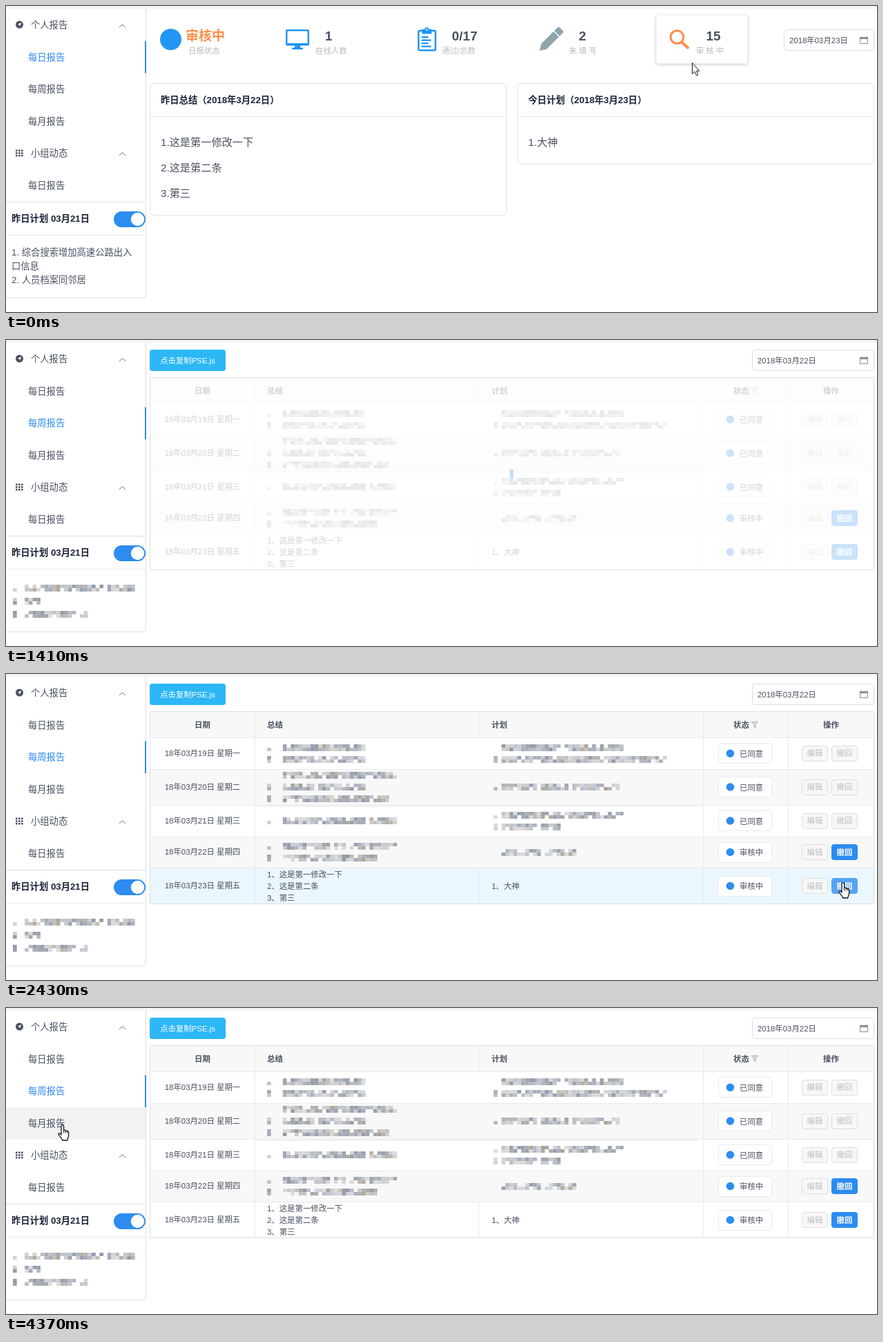
An HTML page with a canvas that plays this animation: 1261 px wide and 444 px high, repeating every 4690 ms.

```html
<!DOCTYPE html>
<html lang="zh-CN">
<head>
<meta charset="utf-8">
<title>日报</title>
<style>
html, body { margin: 0; width: 100%; height: 100%; overflow: hidden; background: #fff; }
canvas { display: block; width: 1261px; height: 444px; }
</style>
</head>
<body>
<canvas id="stage" width="1261" height="444"></canvas>
<script>
const c = document.getElementById('stage').getContext('2d');
const LOOP = 4690, TICK = LOOP / 60;
const FONT = '"Liberation Sans", "Noto Sans CJK SC", "Noto Sans CJK", sans-serif';
const BLUE = '#2d8cf0', INK = '#495060', DARK = '#1c2438', LINE = '#dddee1', SOFT = '#e9eaec', PALE = '#bbbec4';
const ORANGE = '#ff8f4c', STRIPE = '#f8f8f9';
const S = 11.4, M = 13.3, L = 15.2, XL = 19;

// Pointer moves: first tick, last tick, x, y at the end; it rests in between
const MOVES = [
  [0, 0, 993, 82], [0, 7, 98, 146], [7, 8, 102, 152], [9, 12, 102, 127],
  [20, 21, 990, 120], [21, 24, 1135, 257], [24, 27, 1213, 317], [27, 31, 1211, 302],
  [35, 41, 1212, 258], [46, 47, 1196, 262], [47, 53, 90, 196], [53, 56, 81, 169]
];
const PAGE_AT = 1185, HIDE = 16, SHOW = 23;
const ROWS = [92.5, 138, 190, 236, 281, 334];
const MIDS = ROWS.slice(1).map((y, i) => (y + ROWS[i]) / 2);

function pointer(tick) {
  let x = 0, y = 0;
  for (const [a, b, px, py] of MOVES) {
    if (tick < a) break;
    const k = b > a ? Math.min(1, (tick - a) / (b - a)) : 1;
    x += (px - x) * k;
    y += (py - y) * k;
  }
  return { x, y, on: tick < HIDE || tick >= SHOW };
}

const inside = (p, x0, y0, x1, y1) => p.on && p.x >= x0 && p.x < x1 && p.y >= y0 && p.y < y1;
// Hover strength, trailing the pointer by two ticks
const glow = (tick, ...area) => (inside(pointer(Math.max(0, tick - 1)), ...area) + inside(pointer(Math.max(0, tick - 2)), ...area)) / 2;

function rect(x, y, w, h, color) {
  c.fillStyle = color;
  c.fillRect(x, y, w, h);
}

function round(x, y, w, h, r, color) {
  c.beginPath();
  c.roundRect(x, y, w, h, r);
  c.fillStyle = color;
  c.fill();
}

function frame(x0, y0, x1, y1, r, color, fill) {
  c.beginPath();
  c.roundRect(x0 + .5, y0 + .5, x1 - x0 - 1, y1 - y0 - 1, r);
  if (fill) { c.fillStyle = fill; c.fill(); }
  c.strokeStyle = color;
  c.lineWidth = 1;
  c.stroke();
}

function disc(x, y, r, color) {
  c.beginPath();
  c.arc(x, y, r, 0, 7);
  c.fillStyle = color;
  c.fill();
}

function line(color, width, ...pts) {
  c.beginPath();
  for (let i = 0; i < pts.length; i += 2) c.lineTo(pts[i], pts[i + 1]);
  c.strokeStyle = color;
  c.lineWidth = width;
  c.stroke();
}

// y is the middle of the glyphs
function text(s, x, y, size, color = INK, bold = false, align = 'left') {
  c.font = (bold ? 'bold ' : '') + size + 'px ' + FONT;
  c.textAlign = align;
  c.fillStyle = color;
  c.fillText(s, x, y + size * .37);
}

const lineY = (mid, i, n, pitch) => mid + (i - (n - 1) / 2) * pitch;

// Censored lines: a marker block, a gap, then random blocks up to each width
function mosaic(x, mid, pitch, gap, widths, seed) {
  const rnd = () => (seed = (seed * 16807) % 2147483647) / 2147483647;
  const cell = 5.7;
  widths.forEach((w, i) => {
    const y = Math.round(lineY(mid, i, widths.length, pitch)) - 5;
    for (let row = 0; row < 2; row++)
      for (let dx = 0; dx < w - 2; dx += cell) {
        const skip = dx > 1 && dx < gap || rnd() < .14;
        const hue = rnd() < .2 ? 35 : 218, light = 62 + rnd() * 25;
        if (!skip) rect(x + dx, y + row * 5, cell, 5, `hsl(${hue}, 11%, ${light}%)`);
      }
  });
}

function calendar(x, y, color) {
  frame(x, y + 1, x + 12, y + 11, 0, color);
  rect(x, y + 1, 12, 3, color);
  rect(x + 2, y, 1, 2, color);
  rect(x + 9, y, 1, 2, color);
}

function sidebar(p, page) {
  const step = 46.5, active = page ? 2 : 1;
  for (let i = 1; i < 6; i++) {
    const y = 4.5 + i * step;
    if (i !== active && inside(p, 0, y, 203, y + step)) rect(0, Math.round(y), 202, step, '#f2f2f2');
  }
  rect(202, 4, 1, 280, LINE);
  rect(201, 4.5 + active * step, 2, step, BLUE);

  disc(19.5, 27, 5.5, INK);
  c.fillStyle = '#fff';
  c.fill(new Path2D('M22.5 24 16.5 26.8 19.2 27.3 19.8 30Z'));
  for (let i = 0; i < 9; i++) rect(14 + i % 3 * 4, 208.5 + Math.floor(i / 3) * 3.7, 2.6, 2.5, INK);

  ['个人报告', '每日报告', '每周报告', '每月报告', '小组动态', '每日报告'].forEach((s, i) => {
    const head = i % 4 === 0, y = 27.5 + i * step;
    text(s, head ? 36 : 32, y, M, i === active ? BLUE : INK);
    if (head) line('#70757f', 1, 164, y + 3.5, 168.5, y - 1, 173, y + 3.5);
  });

  frame(-8, 284, 203, 424, 4, LINE, '#fff');
  rect(0, 332, 203, 1, SOFT);
  text('昨日计划 03月21日', 8, 308, M, DARK, true);
  round(156, 298, 46, 23, 11.5, BLUE);
  disc(190.5, 309.5, 9.7, '#fff');

  if (page) mosaic(10, 379, 19, 14, [174, 38, 106], 4321);
  else ['1. 综合搜索增加高速公路出入', '口信息', '2. 人员档案同邻居']
    .forEach((s, i) => text(s, 8, 357.5 + i * 20, M));
}

function statIcons() {
  const blue = '#2196f3';
  disc(238.5, 48.5, 15.5, blue);

  // monitor
  round(405, 34, 34, 23.5, 2, blue);
  rect(407.5, 36.5, 29, 17.5, '#fff');
  rect(418, 57, 8, 4, blue);
  rect(414, 60.5, 16, 2.5, blue);

  // clipboard
  round(596, 34.5, 27, 31, 3, blue);
  rect(598.5, 37, 22, 26, '#fff');
  round(602, 33.5, 14.5, 7, 2, blue);
  disc(609.2, 34, 3, blue);
  disc(609.2, 34.5, 1.2, '#fff');
  for (let i = 0; i < 4; i++) rect(601.5, 44 + i * 4.5, i % 2 ? 14 : 10, 2.3, blue);

  // pencil
  c.save();
  c.translate(772.5, 65);
  c.rotate(-Math.PI / 4);
  c.fillStyle = '#90a4ae';
  c.fill(new Path2D('M0 0 9-5.5H34V5.5H9Z'));
  round(35.5, -5.5, 9, 11, [0, 3, 3, 0], '#90a4ae');
  c.restore();

  // magnifier
  c.beginPath();
  c.arc(971.5, 45, 9.3, 0, 7);
  c.strokeStyle = ORANGE;
  c.lineWidth = 3;
  c.stroke();
  c.lineCap = 'round';
  line(ORANGE, 4, 979, 53, 987, 60.5);
  c.lineCap = 'butt';
}

function card(x, y1, title, items) {
  frame(x, 112, x + 517, y1, 4, '#e3e4e8', '#fff');
  rect(x, 160, 517, 1, SOFT);
  text(title, x + 16, 136, M, DARK, true);
  items.forEach((s, i) => text(s, x + 16, 197 + i * 37, L));
}

function daily(tick) {
  const lift = glow(tick, 941, 13, 1074, 84);
  if (lift) {
    c.save();
    c.globalAlpha = lift;
    c.shadowColor = 'rgba(0,0,0,.25)';
    c.shadowBlur = 5;
    c.shadowOffsetY = 1;
    round(941.5, 13.5, 132, 70, 3, '#fff');
    c.restore();
  }
  statIcons();
  const stats = [
    ['审核中', 288.5, '日报状态', 264], ['1', 467, '在线人数', 448], ['0/17', 664, '通过/总数', 631],
    ['2', 834.5, '未 填 写', 815], ['15', 1024, '审 核 中', 999]
  ];
  stats.forEach(([value, mid, label, x], i) => {
    text(value, mid, 42.5, XL, i ? INK : ORANGE, true, 'center');
    text(label, x, 65, S, '#bbb');
  });

  frame(1126, 34, 1257, 65, 4, LINE);
  text('2018年03月23日', 1134, 50, S);
  calendar(1236, 44, '#9a8a84');

  card(208, 304, '昨日总结（2018年3月22日）', ['1.这是第一修改一下', '2.这是第二条', '3.第三']);
  card(740, 230, '今日计划（2018年3月23日）', ['1.大神']);
}

function button(x, mid, label, p, active) {
  const y = Math.round(mid - 11.5);
  const fill = !active ? '#f7f7f7' : inside(p, x, y, x + 38, y + 23) ? '#57a3f3' : BLUE;
  frame(x, y, x + 38, y + 23, 3, active ? fill : LINE, fill);
  text(label, x + 19, mid, S, active ? '#fff' : PALE, active, 'center');
}

function grid(tick) {
  rect(208, 54, 1049, 280, '#fff');
  rect(208, 54, 1049, 38.5, STRIPE);
  MIDS.forEach((_, i) => {
    const y = ROWS[i], h = ROWS[i + 1] - y;
    if (i % 2) rect(208, y, 1049, h, STRIPE);
    c.globalAlpha = glow(tick, 208, y, 1257, y + h);
    rect(208, y, 1049, h, '#ebf7ff');
    c.globalAlpha = 1;
    rect(208, Math.floor(y), 1049, 1, SOFT);
  });
  rect(364, 189, 638, 4, '#f1f1f2');
  for (const x of [360, 1009, 1132]) rect(x, 54, 1, 280, SOFT);
  rect(684, 54, 1, 39, SOFT);
  rect(684, 281, 1, 53, SOFT);
}

function table(tick, p) {
  grid(tick);
  text('日期', 284.5, 73.5, S, INK, true, 'center');
  text('总结', 378, 73.5, S, INK, true);
  text('计划', 703, 73.5, S, INK, true);
  text('状态', 1053, 73.5, S, INK, true);
  text('操作', 1194.5, 73.5, S, INK, true, 'center');
  const funnel = new Path2D('M1079 69H1089L1085.5 73.5V78L1082.5 76.5V73.5Z');
  c.fillStyle = '#d5d7db';
  c.fill(funnel);
  c.strokeStyle = PALE;
  c.lineWidth = 1;
  c.stroke(funnel);

  MIDS.forEach((y, i) => {
    text(`18年03月${19 + i}日 星期${'一二三四五'[i]}`, 284.5, y - .5, S, INK, false, 'center');
    frame(1031, Math.round(y - 15), 1109, Math.round(y + 15), 3, SOFT, '#fff');
    disc(1048.5, y, 5.8, BLUE);
    text(i < 3 ? '已同意' : '审核中', 1062, y + .5, S);
    button(1152, y, '编辑', p, false);
    button(1195, y, '撤回', p, i > 2);
  });

  const done = [[142, 142], [190, 142, 174], [190], [190, 156]];
  const plan = [[186, 256], [184], [186, 94], [118]];
  done.forEach((w, i) => mosaic(378, MIDS[i], 17, 20, w, 911 + i * 77));
  plan.forEach((w, i) => mosaic(706, MIDS[i], 17, 11, w, 5113 + i * 77));
  ['1、这是第一修改一下', '2、这是第二条', '3、第三']
    .forEach((s, i) => text(s, 378, lineY(MIDS[4], i, 3, 17.2), S));
  text('1、大神', 703, MIDS[4], S);

  // loading veil
  const veil = Math.min(.75, Math.max(0, (22 - tick) / 4));
  if (veil) rect(208, 54, 1049, 280, `rgba(255,255,255,${veil})`);
  if (tick >= 16 && tick < 20) rect(729.5, 188, 5, 12, '#bddcf8');
  frame(208, 54, 1257, 334, 0, LINE);
}

function weekly(tick, p) {
  round(208, 14, 110, 31, 4, '#2db7f5');
  text('点击复制PSE.js', 263, 29.5, S, '#fff', false, 'center');
  frame(1080, 14, 1257, 45, 4, LINE);
  text('2018年03月22日', 1088, 30, S);
  calendar(1236, 24, '#8a8e98');
  table(tick, p);
}

const ARROW = new Path2D('M.5.5V16.5L4 13.2 6.6 18.8 9 17.7 6.5 12.2H10.8Z');
const HAND = new Path2D('M5 13V2.5a1.8 1.8 0 0 1 3.6 0V8.5a1.6 1.6 0 0 1 2.6.6 1.6 1.6 0 0 1 2.4.9 1.4 1.4 0 0 1 2 1.3V16c0 3-1.6 4-1.8 7H6.5c0-2-3-5-5.3-8.2-1-1.6.8-2.9 2.2-1.6L5 15Z');

function cursor(p, page) {
  if (!p.on) return;
  const onButton = MIDS.slice(3).some(y => inside(p, 1195, y - 12, 1234, y + 12));
  const hand = page && p.x < 203 || onButton;
  const shape = hand ? HAND : ARROW;
  c.save();
  c.translate(Math.round(p.x) - (hand ? 6 : 0), Math.round(p.y));
  c.fillStyle = '#fff';
  c.strokeStyle = '#15171c';
  c.lineWidth = hand ? 1.3 : 1;
  c.lineJoin = 'round';
  c.fill(shape);
  c.stroke(shape);
  if (hand) for (let i = 0; i < 3; i++) line('#15171c', 1, 8.6 + i * 2.5, 8.5 + i * .7, 8.6 + i * 2.5, 12.5);
  c.restore();
}

function draw(now) {
  const t = now % LOOP, tick = Math.floor((t + 10) / TICK);
  const p = pointer(tick), page = t >= PAGE_AT;
  rect(0, 0, 1261, 444, '#fff');
  rect(0, 0, 1261, 4.5, '#f5f5f5');
  sidebar(p, page);
  if (page) weekly(tick, p);
  else daily(tick);
  cursor(p, page);
}

const start = performance.now();
function loop() {
  draw(performance.now() - start);
  requestAnimationFrame(loop);
}
loop();
</script>
</body>
</html>
```
